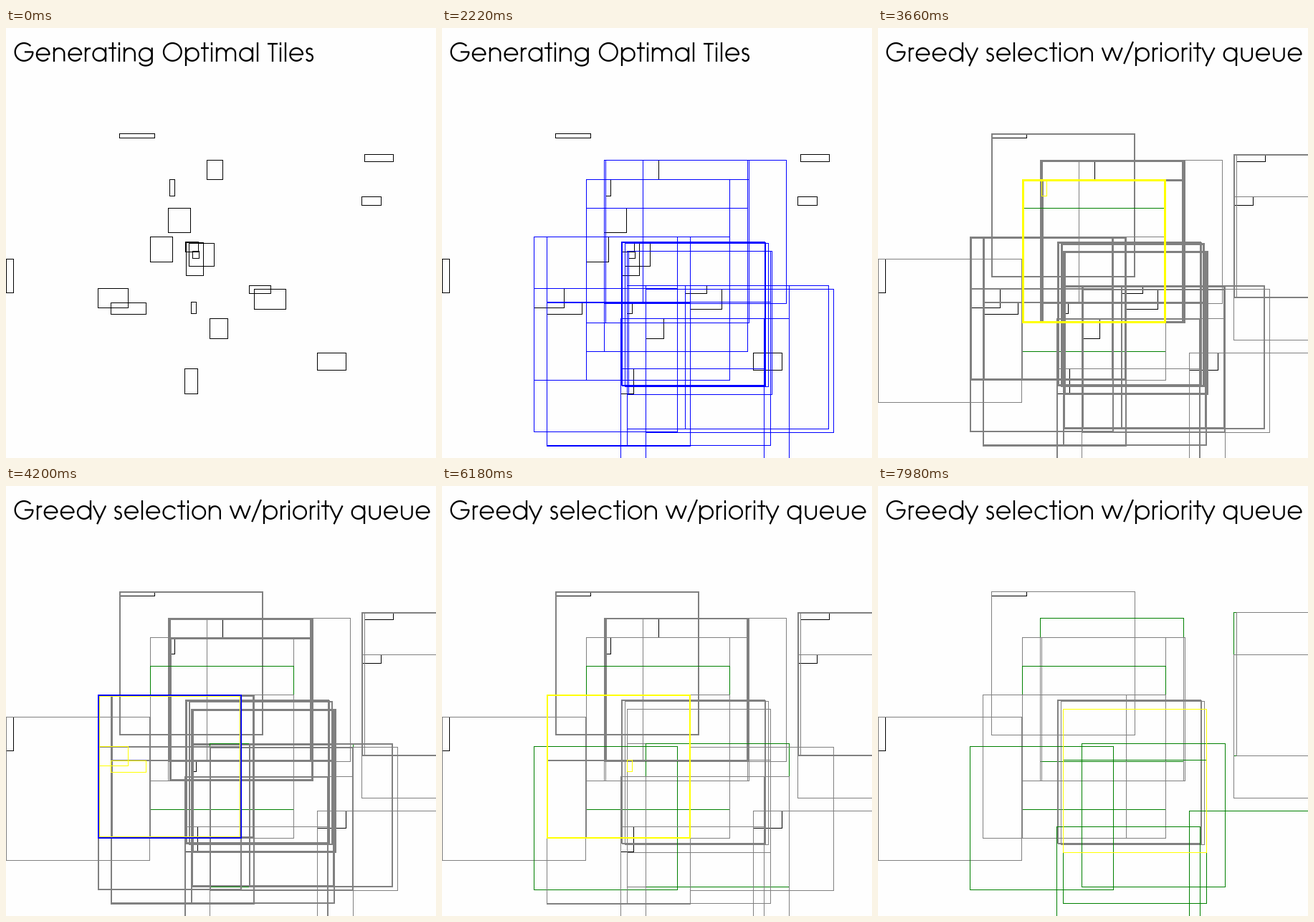
Write a matplotlib script that moves like this. It is 600 px wide and 600 px high and loops after 8 s.

```python
import math
import numpy as np
import matplotlib.pyplot as plt
from matplotlib.animation import FuncAnimation
from matplotlib.collections import LineCollection, PolyCollection

SIZE, DPI, TICK = 600, 100, 20
PX = 72 / DPI
STEP, GROW_AT, PICK_AT = 60, 600, 2940
SIDE, REACH = 200, 120
FOCUS = (300, 330)
BLACK, BLUE, GRAY = "#000000", "#0000ff", "#808080"
GREEN, YELLOW = "#008000", "#ffff00"

# Boxes to cover: left, top, width, height
BOXES = [
    (158, 147, 49, 6), (500, 176, 40, 10), (496, 235, 27, 12),
    (280, 184, 22, 27), (228, 211, 7, 23), (226, 251, 31, 34),
    (201, 291, 31, 35), (250, 298, 18, 14), (251, 299, 24, 46),
    (255, 300, 35, 32), (260, 311, 9, 10), (339, 359, 30, 11),
    (346, 364, 44, 28), (0, 322, 10, 47), (128, 363, 42, 27),
    (146, 383, 49, 16), (258, 382, 7, 16), (284, 405, 25, 28),
    (249, 475, 18, 35), (434, 453, 40, 24),
]


# --- Greedy cover with a lazy priority queue ---

def distance(box):
    x, y, w, h = box
    return math.dist((x + w / 2, y + h / 2), FOCUS)


def covers(tile, box):
    dx, dy = box[0] - tile[0], box[1] - tile[1]
    return min(dx, dy) >= 0 and max(dx + box[2], dy + box[3]) <= REACH


def candidates():
    """Corners shared by every pair of boxes that fits one tile."""
    found = []
    near = sorted(BOXES, key=distance)
    for i, a in enumerate(near):
        for b in near[:i + 1]:
            corner = min(a[0], b[0]), min(a[1], b[1])
            if corner not in found and covers(corner, a) and covers(corner, b):
                found.append(corner)
    return found


def weight(boxes):
    return round(sum(w * h / distance((x, y, w, h)) ** 1.5
                     for x, y, w, h in boxes), 6)


def search(tiles):
    """Record the state of the queue at every pop."""
    left, chosen, log = set(BOXES), set(), []
    queue = {t: {b for b in BOXES if covers(t, b)} for t in tiles}
    while queue:
        probe = max(queue, key=lambda t: (len(queue[t]), weight(queue[t]), t[1]))
        fresh = queue[probe] & left
        log.append((dict(queue), set(left), set(chosen), probe, fresh))
        if fresh == queue[probe]:
            chosen.add(probe)
            left -= fresh
            del queue[probe]
        elif fresh:
            queue[probe] = fresh
        else:
            del queue[probe]
    return log


TILES = candidates()
LOG = search(TILES)


# --- Thin geometric lettering, in em units with y up ---

XH, CAP, DESC = .54, .74, -.19        # x-height, cap height, descender
EDGE, ROUND, OPEN = .1, .0775, .02    # side bearings
R, CX = .25, .3275                    # bowl radius and centre
RIGHT = CX + R
ARCH = .41                            # width of n and u


def arc(cx, cy, rx, ry, a=0, b=360):
    t = np.radians(np.linspace(a, b, 48))
    return np.column_stack([cx + rx * np.cos(t), cy + ry * np.sin(t)])


def line(*pts):
    return np.array(pts, float)


def join(*parts):
    return np.vstack(parts)


def stem(x, top=XH, bottom=0):
    return line((x, bottom), (x, top))


def bowl(a=0, b=360, cx=CX):
    return arc(cx, XH / 2, R, R, a, b)


def arch(x, w):
    return join(arc(x + w / 2, .31, w / 2, .205, 180, 0), line((x + w, 0)))


def big(a=0, b=360):
    return arc(.435, CAP / 2, .35, .35, a, b)


def zigzag(x0, dx, n):
    return line(*[(x0 + i * dx, .03 if i % 2 else XH) for i in range(n)])


GLYPHS = {
    " ": (.277, []),
    "G": (ROUND, [join(big(42, 360), line((.46, CAP / 2)))]),
    "O": (ROUND, [big()]),
    "T": (OPEN, [stem(.215, .7), line((OPEN, .7), (.41, .7))]),
    "a": (EDGE, [bowl(), stem(RIGHT)]),
    "c": (ROUND, [bowl(32, 328)]),
    "d": (EDGE, [bowl(), stem(RIGHT, CAP)]),
    "e": (ROUND, [join(line((CX - R, XH / 2)), bowl(0, 325))]),
    "g": (EDGE, [bowl(), join(line((RIGHT, XH)), arc(CX, 0, R, .17, 0, -165))]),
    "i": (EDGE, [stem(EDGE), stem(EDGE, CAP, .65)]),
    "l": (EDGE, [stem(EDGE, CAP)]),
    "m": (EDGE, [stem(EDGE), arch(EDGE, .37), arch(EDGE + .37, .37)]),
    "n": (EDGE, [stem(EDGE), arch(EDGE, ARCH)]),
    "o": (ROUND, [bowl()]),
    "p": (ROUND, [bowl(cx=EDGE + R), stem(EDGE, XH, DESC)]),
    "q": (EDGE, [bowl(), stem(RIGHT, XH, DESC)]),
    "r": (OPEN, [stem(EDGE), arc(.24, .37, .14, .14, 180, 70)]),
    "s": (ROUND, [join(arc(.195, .40, .115, .11, 30, 270),
                       arc(.185, .15, .13, .135, 90, -155))]),
    "t": (OPEN, [stem(.17, CAP), line((OPEN, .51), (.32, .51))]),
    "u": (EDGE, [join(line((EDGE, XH)),
                      arc(EDGE + ARCH / 2, .22, ARCH / 2, .21, 180, 360),
                      line((EDGE + ARCH, XH)))]),
    "w": (OPEN, [zigzag(OPEN, .198, 5)]),
    "y": (OPEN, [zigzag(OPEN, .25, 2), line((.51, XH), (.17, DESC))]),
    "/": (OPEN, [line((.05, -.1), (.41, .78))]),
}


def lettering(text, x=9.7, base=46.5, em=35.3):
    strokes = []
    for ch in text:
        pad, parts = GLYPHS[ch]
        strokes += [p * (em, -em) + (x, base) for p in parts]
        x += em * (pad + max((p[:, 0].max() for p in parts), default=0))
    return LineCollection(strokes, colors=BLACK, linewidths=2.3 * PX,
                          joinstyle="bevel", capstyle="butt")


# --- Scene ---

def outline(x, y, w, h, color, inset=0):
    l, t = x + .5 + inset, y + .5 + inset
    r, b = x + w + .5 - inset, y + h + .5 - inset
    return [(l, t), (r, t), (r, b), (l, b)], color


def frame(tile, color, count=1):
    """Tile border that thickens inward with the number of boxes."""
    px = round(1 + math.log2(max(count, 1)))
    return [outline(*tile, SIDE, SIDE, color, i) for i in range(px)]


def by_row(tiles):
    return sorted(tiles, key=lambda t: (t[1], t[0]))


def growing(t):
    shapes = [outline(*b, BLACK) for b in BOXES]
    count = 0 if t < GROW_AT else (t - GROW_AT) // STEP + 1
    for tile in by_row(TILES[:count]):
        shapes += frame(tile, BLUE)
    return shapes


def picking(k):
    pop, phase = divmod(k - 2, 2)
    queue, left, chosen, probe, fresh = LOG[max(pop, 0)]
    shapes = [outline(*b, BLACK) for b in BOXES if b in left]
    for tile in by_row(chosen | set(queue)):
        if tile in chosen:
            shapes += frame(tile, GREEN)
        else:
            shapes += frame(tile, GRAY, len(queue[tile]))
    if pop >= 0:
        shapes += [outline(*b, YELLOW) for b in fresh]
        shapes += frame(probe, YELLOW, len(queue[probe]))
        if phase and fresh:
            shapes += frame(probe, BLUE, len(fresh))
    return shapes


fig = plt.figure(figsize=(SIZE / DPI, SIZE / DPI), dpi=DPI, facecolor="#fefefe")
ax = fig.add_axes([0, 0, 1, 1])
ax.set_xlim(0, SIZE)
ax.set_ylim(SIZE, 0)
ax.axis("off")

rects = PolyCollection([], facecolors="none", linewidths=PX,
                       antialiaseds=False, joinstyle="miter")
rects.set_snap(False)
ax.add_collection(rects, autolim=False)
titles = [lettering("Generating Optimal Tiles"),
          lettering("Greedy selection w/priority queue")]
for title in titles:
    ax.add_collection(title, autolim=False)


def draw(i):
    t = i * TICK
    late = t >= PICK_AT
    shapes = picking((t - PICK_AT) // STEP) if late else growing(t)
    rects.set_verts([s for s, _ in shapes])
    rects.set_edgecolor([c for _, c in shapes])
    titles[0].set_visible(not late)
    titles[1].set_visible(late)
    return [rects, *titles]


anim = FuncAnimation(fig, draw, frames=8000 // TICK, interval=TICK,
                     repeat=True, repeat_delay=0)
plt.show()
```
